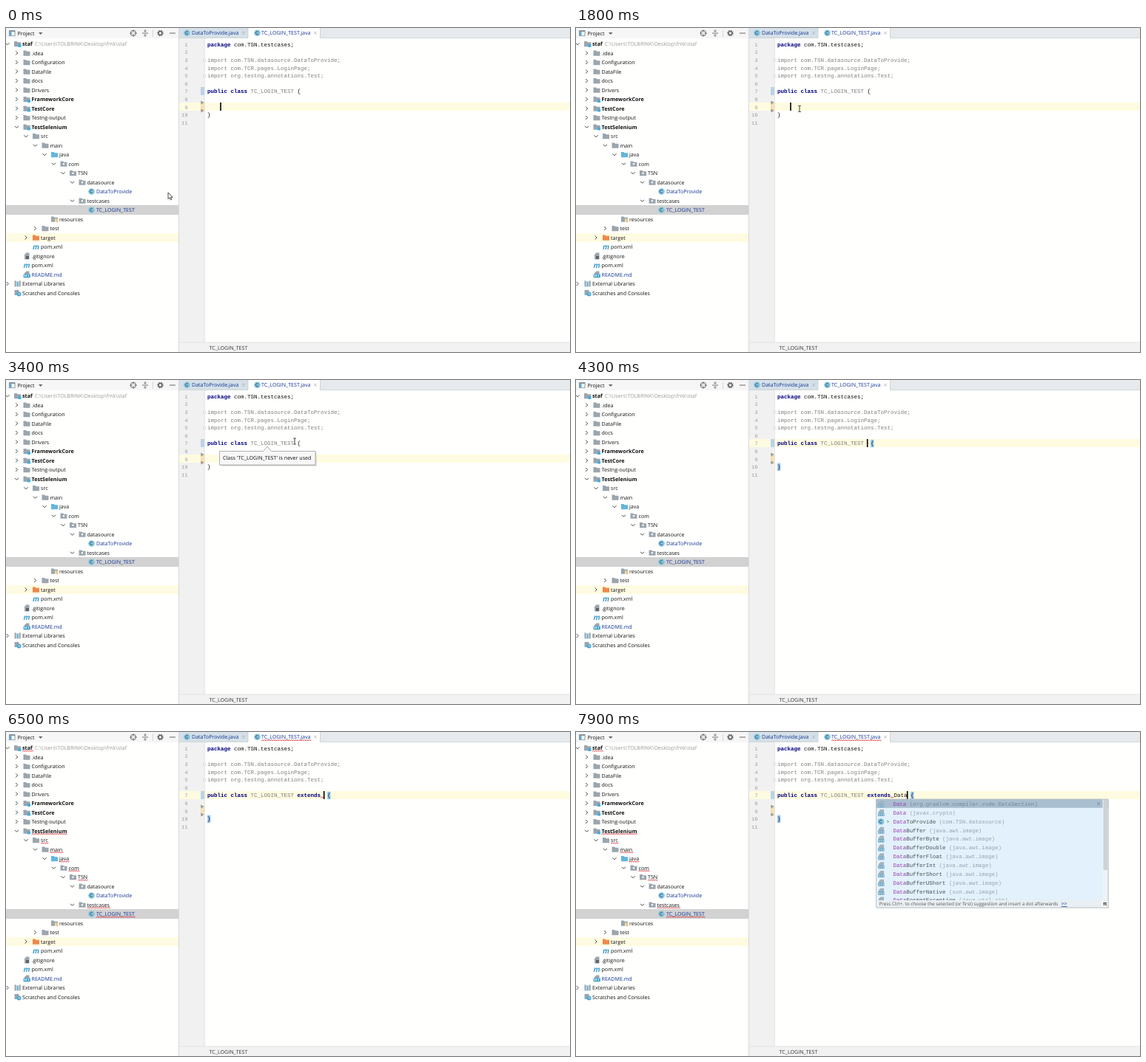
Animation, 762 px wide and 439 px high, one loop 8 s. Source, as an HTML page:

```html
<!DOCTYPE html>
<html lang="en">
<head>
<meta charset="utf-8">
<title>Editor session</title>
<style>
  html, body { margin: 0; width: 100%; height: 100%; overflow: hidden; background: #fff; }
  svg { display: block; width: 762px; height: 439px; }
  text { white-space: pre; text-rendering: geometricPrecision; }
  .ui { font: 7.1px "Open Sans", "Noto Sans", sans-serif; }
  .ui.b { font-size: 7.2px; font-weight: bold; }
  .code { font: 7.5px "Liberation Mono", "Courier New", monospace; }
</style>
</head>
<body>
<svg id="stage" viewBox="0 0 762 439" xmlns="http://www.w3.org/2000/svg"></svg>
<script>
const LOOP = 8000, CHAR = 4.5, CODE_X = 272, ROW = 12.5;
const NAVY = '#000080', GRAY = '#808080', INK = '#111', LINK = '#0f3494';
const stage = document.getElementById('stage');
const lineY = n => 22.5 + 10.6 * (n - 1);
const lineTop = n => Math.floor(lineY(n) - 5.6);

function el(tag, attrs, parent = stage) {
  const node = document.createElementNS('http://www.w3.org/2000/svg', tag);
  for (const key in attrs) node.setAttribute(key, attrs[key]);
  return parent.appendChild(node);
}
const group = (parent = stage) => el('g', {}, parent);
const rect = (x, y, width, height, fill, parent) => el('rect', { x, y, width, height, fill }, parent);
const stroke = (d, color, width = 1, parent) =>
  el('path', { d, fill: 'none', stroke: color, 'stroke-width': width }, parent);
const show = (node, on) => node.setAttribute('visibility', on ? 'visible' : 'hidden');

function text(x, y, content, fill = INK, cls = 'ui', parent) {
  const node = el('text', { x, y, fill, class: cls }, parent);
  node.textContent = content;
  return node;
}

// Each part is [string, colour, bold]
function spans(node, parts) {
  node.textContent = '';
  for (const [content, fill, bold] of parts) {
    const span = el('tspan', { fill, 'font-weight': bold ? 700 : 400 }, node);
    span.textContent = content;
  }
}

function squiggle(x, y, width, parent) {
  let d = `M${x} ${y}`;
  for (let i = 0; i * 1.5 < width; i++) d += `l1.5 ${i % 2 ? 0.8 : -0.8}`;
  stroke(d, '#d8343a', 0.9, parent);
}

function folder(x, y, color, parent) {
  el('path', { d: `M${x - 4.5} ${y - 3.5}h3.5l1.2 1.2h4.3v6h-9z`, fill: color }, parent);
}

function classIcon(x, y, parent) {
  el('circle', { cx: x, cy: y, r: 4.3, fill: '#84c5df' }, parent);
  stroke(`M${x + 1.5} ${y - 1.2}a2 2 0 1 0 0 2.4`, '#31505f', 0.9, parent);
}

function icon(kind, x, y) {
  const gray = '#9ba5ad';
  switch (kind) {
    case 'class': classIcon(x, y); break;
    case 'maven': {
      const m = text(x - 4.5, y + 3, 'm', '#3d9fcf', 'ui b');
      m.setAttribute('style', 'font-size:10px;font-style:italic');
      break;
    }
    case 'git':
      el('path', { d: `M${x - 3} ${y - 2}l2.5-2.5h4v9h-6.5z`, fill: gray });
      rect(x - 1, y, 4, 4, '#59636b');
      break;
    case 'md':
      el('path', { d: `M${x - 3} ${y - 2}l2.5-2.5h4v9h-6.5z`, fill: gray });
      rect(x - 4.5, y - 0.5, 9.5, 4.5, '#4aa3d0');
      stroke(`M${x - 3} ${y + 3}v-2.5l1.3 1.3 1.3-1.3v2.5M${x + 2.5} ${y}v3`, '#fff', 0.7);
      break;
    case 'library':
      for (let i = 0; i < 3; i++) rect(x - 4 + 3 * i, y - 4 + (i % 2), 2.2, 8 - (i % 2), i === 1 ? '#62b1d6' : gray);
      break;
    case 'scratch':
      el('path', { d: `M${x - 4} ${y - 4}h6v3l-3 4h-3z`, fill: gray });
      el('circle', { cx: x + 2, cy: y + 1.5, r: 3, fill: '#4aa9d5' });
      stroke(`M${x + 2} ${y}v1.7h1.5`, '#fff', 0.7);
      break;
    default:
      folder(x, y, { source: '#62b7dc', target: '#f0894a' }[kind] || gray);
      if (kind === 'module') rect(x + 1, y + 0.5, 4, 4, '#42b0dd');
      if (kind === 'package') el('circle', { cx: x, cy: y + 0.3, r: 1.2, fill: '#fff' });
      if (kind === 'resources') {
        rect(x + 0.5, y - 0.5, 4.5, 4.8, '#fff');
        for (let i = 0; i < 3; i++) rect(x + 1, y + 1.7 * i - 0.5, 4, 0.9, '#d8a13c');
      }
  }
}

// [level, arrow, icon, label, style flags: b bold, l link colour, e gets an error underline]
const tree = [
  [0, 'v', 'module', 'staf', 'be'],
  [1, '>', 'folder', '.idea'],
  [1, '>', 'folder', 'Configuration'],
  [1, '>', 'folder', 'DataFile'],
  [1, '>', 'folder', 'docs'],
  [1, '>', 'folder', 'Drivers'],
  [1, '>', 'module', 'FrameworkCore', 'b'],
  [1, '>', 'module', 'TestCore', 'b'],
  [1, '>', 'folder', 'Testng-output'],
  [1, 'v', 'module', 'TestSelenium', 'be'],
  [2, 'v', 'folder', 'src', 'e'],
  [3, 'v', 'folder', 'main', 'e'],
  [4, 'v', 'source', 'java', 'e'],
  [5, 'v', 'package', 'com', 'e'],
  [6, 'v', 'package', 'TSN', 'e'],
  [7, 'v', 'package', 'datasource'],
  [8, '', 'class', 'DataToProvide', 'l'],
  [7, 'v', 'package', 'testcases', 'e'],
  [8, '', 'class', 'TC_LOGIN_TEST', 'le'],
  [4, '', 'resources', 'resources'],
  [3, '>', 'folder', 'test'],
  [2, '>', 'target', 'target'],
  [2, '', 'maven', 'pom.xml'],
  [1, '', 'git', '.gitignore'],
  [1, '', 'maven', 'pom.xml'],
  [1, '', 'md', 'README.md', 'l'],
  [0, '>', 'library', 'External Libraries'],
  [0, '', 'scratch', 'Scratches and Consoles']
];

function drawTree(errors) {
  rect(0, 240, 233, 13, '#d2d2d2');
  rect(0, 278, 233, 12, '#fffbe2');
  tree.forEach(([level, arrow, kind, label, flags = ''], i) => {
    const x = ROW * level, y = 21.5 + ROW * i;
    if (arrow === 'v') stroke(`M${x - 0.5} ${y - 1.2}l2.5 2.5 2.5-2.5`, '#444', 1);
    if (arrow === '>') stroke(`M${x + 0.7} ${y - 2.5}l2.5 2.5-2.5 2.5`, '#444', 1);
    icon(kind, x + 15.5, y);
    const node = text(x + 22, y + 2.5, label, flags.includes('l') ? LINK : INK, flags.includes('b') ? 'ui b' : 'ui');
    if (flags.includes('e')) squiggle(x + 22, y + 4.6, node.getComputedTextLength(), errors);
  });
  text(39, 24, 'C:\\Users\\TOLBRINK\\Desktop\\fmk\\staf', '#999');
}

function drawHeader() {
  rect(0, 0, 233, 14, '#f6f6f6');
  rect(4, 3, 8.5, 8, '#8b969e');
  rect(5, 5.2, 6.5, 5, '#fff');
  rect(5, 5.2, 2.5, 5, '#55acd6');
  text(15.5, 9.7, 'Project');
  el('path', { d: 'M44 6h5.5l-2.75 3z', fill: '#666' });
  el('circle', { cx: 172, cy: 7, r: 3.7, fill: 'none', stroke: '#666', 'stroke-width': 1 });
  stroke('M172 2.5v3.2M172 8.3v3.2M167.5 7h3.2M173.3 7h3.2', '#666');
  stroke('M184 7h8M188 2v3M188 12v-3M186.3 3.6l1.7 1.7 1.7-1.7M186.3 10.4l1.7-1.7 1.7 1.7', '#666', 0.9);
  stroke('M198.5 2v10', '#d0d0d0', 0.8);
  el('circle', { cx: 208.5, cy: 7, r: 2.5, fill: 'none', stroke: '#666', 'stroke-width': 1.6 });
  el('circle', { cx: 208.5, cy: 7, r: 3.7, fill: 'none', stroke: '#666', 'stroke-width': 1.2, 'stroke-dasharray': '1.45 1.45' });
  stroke('M221 7h8', '#666');
}

function drawTabs(errors) {
  rect(234, 0, 528, 14, '#e6eaed');
  rect(234, 0, 93, 13, '#d5e0e8');
  rect(327, 0, 97, 14, '#fff');
  rect(234, 13, 93, 1, '#d3d7d9');
  rect(424, 13, 338, 1, '#d3d7d9');
  stroke('M327 0v13M424.5 0v13', '#c9cdd0', 0.8);
  [[244.5, 251, 'DataToProvide.java', 321], [339.5, 345, 'TC_LOGIN_TEST.java', 418]].forEach(([ix, tx, name, close]) => {
    classIcon(ix, 6.7);
    text(tx, 9.4, name, LINK);
    stroke(`M${close - 1.8} 4.8l3.6 3.6m0-3.6l-3.6 3.6`, '#aaa', 0.8);
  });
  squiggle(345, 11.6, 67, errors);
}

function drawCode() {
  const put = (n, parts) => {
    const node = text(CODE_X, lineY(n) + 2.3, '', INK, 'code');
    spans(node, parts);
    return node;
  };
  for (let n = 1; n <= 11; n++) {
    const num = text(245.5, lineY(n) + 2.2, n, '#999', 'code');
    num.setAttribute('text-anchor', 'end');
    num.setAttribute('style', 'font-size:6.8px');
  }
  put(1, [['package ', NAVY, 1], ['com.TSN.testcases;', INK]]);
  put(3, [['import com.TSN.datasource.DataToProvide;', GRAY]]);
  put(4, [['import com.TCR.pages.LoginPage;', GRAY]]);
  put(5, [['import org.testng.annotations.Test;', GRAY]]);
  put(10, [['}', INK]]);
  return put(7, []);
}

function drawTooltip() {
  const g = group();
  const d = 'M288.5 96.5h59l5.5-6.5 5.5 6.5h59.5v18.5h-129.5z';
  el('path', { d, fill: '#000', opacity: 0.1, transform: 'translate(1.8 2)' }, g);
  el('path', { d, fill: '#000', opacity: 0.12, transform: 'translate(.8 1)' }, g);
  el('path', { d, fill: '#f7f7f7', stroke: '#a9a9a9', 'stroke-width': 0.9 }, g);
  text(293, 108, "Class 'TC_LOGIN_TEST' is never used", INK, 'ui', g);
  return g;
}

function drawPopup() {
  const g = group();
  const rows = [
    ['', 'org.graalvm.compiler.code.DataSection'], ['', 'javax.crypto'], ['ToProvide', 'com.TSN.datasource'],
    ['Buffer', 'java.awt.image'], ['BufferByte', 'java.awt.image'], ['BufferDouble', 'java.awt.image'],
    ['BufferFloat', 'java.awt.image'], ['BufferInt', 'java.awt.image'], ['BufferShort', 'java.awt.image'],
    ['BufferUShort', 'java.awt.image'], ['BufferNative', 'sun.awt.image'], ['FormatException', 'java.util.zip']
  ];
  rect(406, 92, 314, 147, 'rgba(0,0,0,.1)', g);
  rect(405, 91, 314, 147, '#e2f1fb', g);
  rect(405, 91, 314, 11.8, '#a9bfd0', g);
  rows.forEach(([rest, pkg], i) => {
    const y = 97.7 + 11.85 * i;
    if (i === 2) {
      classIcon(412, y, g);
      stroke(`M420 ${y - 1.5}l2.5 1.5-2 1.2`, '#5aa55a', 1, g);
    } else {
      el('path', { d: `M409 ${y - 2}l2.5-2.5h4.5v9h-7z`, fill: '#a3b3bf' }, g);
      rect(408, y, 8.5, 4.3, '#6fa6c4', g);
      stroke(`M409.5 ${y + 0.8}v2.7M412.2 ${y + 0.8}v2.7M415 ${y + 0.8}v2.7`, '#e7f2fc', 0.8, g);
    }
    const row = text(428.5, y + 2.3, '', INK, 'code', g);
    row.setAttribute('style', 'font-size:7.4px');
    spans(row, [['Data', '#9a3bb0'], [rest, '#4a5157'], [` (${pkg})`, i ? '#98a3ab' : '#748694']]);
  });
  stroke('M704 95l2 2m2-2l-2 2m-2 2l2-2m2 2l-2-2', '#708296', 0.7, g);
  rect(711.5, 91, 7, 137, '#edf3f7', g);
  rect(712.5, 91, 5.5, 96, '#cdd2d5', g);
  rect(405, 228, 314, 10, '#e9eff2', g);
  const hint = text(409.5, 235.3, 'Press Ctrl+. to choose the selected (or first) suggestion and insert a dot afterwards', '#555', 'ui', g);
  hint.setAttribute('style', 'font-size:6.35px');
  const more = text(655.5, 235.3, '>>', LINK, 'ui', g);
  more.setAttribute('text-decoration', 'underline');
  rect(709.5, 228.5, 9, 9, '#f6f6f6', g);
  text(712, 235.2, 'π', '#333', 'ui b', g);
  el('rect', { x: 405.4, y: 91, width: 313.6, height: 147, fill: 'none', stroke: '#b4bfc7', 'stroke-width': 0.8 }, g);
  return g;
}

// Static scene, back to front
rect(0, 0, 762, 439, '#fffffe');
const errors = group();
drawTree(errors);
drawHeader();
rect(234, 14, 34, 412, '#f1f1f1');
const band = rect(234, 0, 528, 11, '#fffbe1');
stroke('M268.3 14v412', '#dcdcdc', 0.8);
stroke('M233.5 0v439', '#d8d8d8');
drawTabs(errors);
rect(234, 426, 528, 13, '#f2f2f2');
stroke('M234 426h528', '#dcdcdc', 0.8);
text(274.5, 436.3, 'TC_LOGIN_TEST', '#333');
for (const n of [3, 5]) el('circle', { cx: 268.3, cy: lineY(n), r: 1.8, fill: '#fff', stroke: '#c4c4c4', 'stroke-width': 0.7 });
rect(263, 80, 5, 11, '#b9d3e6');
rect(263, 101, 5, 11, '#f3e0b8');
for (const y of [101, 112]) el('path', { d: `M263.3 ${y - 2.5}l4.4 2.5-4.4 2.5z`, fill: '#9a9892' });
const openBrace = rect(0, 80.8, CHAR, 10.5, '#9bcdf5');
const closeBrace = rect(CODE_X, 112.6, CHAR, 10.5, '#9bcdf5');
const classLine = drawCode();
squiggle(CODE_X + 34 * CHAR, 89, CHAR, errors);
stage.appendChild(errors);
const caret = rect(0, 0, 1.6, 11, '#000');
const tooltip = drawTooltip();
const popup = drawPopup();
const arrow = el('path', { d: 'M0 0v8.6l2-1.8 1.4 3.1 1.4-.6-1.4-3h2.7z', fill: '#fff', stroke: '#222', 'stroke-width': 0.8 });
const beam = stroke('M-1.8-4h1.3q.5 0 .5.5v7q0 .5-.5.5h-1.3M1.8-4h-1.3q-.5 0-.5.5M1.8 4h-1.3q-.5 0-.5-.5', '#222', 0.9);

const CLICK = 3550, HIDE_POINTER = 4200, ERRORS_AT = 6000, POPUP_AT = 7800;
const TYPED = ' extends Data';
const keyTimes = [4200, 4700, 4800, 4900, 5000, 5100, 5200, 5300, 5400, 7400, 7600, 7700, 7800];
// [time, x, y] stops of the mouse pointer
const stops = [[0, 219, 223], [900, 219, 223], [1600, 302, 109.5], [1900, 302, 109.5],
  [2200, 353, 86], [2800, 353, 86], [3200, 390, 83]];

function pointerAt(t) {
  const next = stops.findIndex(s => s[0] > t);
  if (next < 0) return stops[stops.length - 1].slice(1);
  const [t0, x0, y0] = stops[next - 1], [t1, x1, y1] = stops[next];
  const p = (t - t0) / (t1 - t0), e = p * p * (3 - 2 * p);
  return [x0 + (x1 - x0) * e, y0 + (y1 - y0) * e];
}

function render(t) {
  const clicked = t >= CLICK;
  const count = keyTimes.filter(k => t >= k).length;
  const typed = TYPED.slice(0, count);
  const top = lineTop(clicked ? 7 : 9);

  spans(classLine, [['public class ', NAVY, 1], ['TC_LOGIN_TEST', GRAY],
    [typed.slice(0, 8), count >= 8 ? NAVY : INK, count >= 8], [typed.slice(8), INK], [' {', INK]]);
  band.setAttribute('y', top);
  openBrace.setAttribute('x', CODE_X + (27 + count) * CHAR);
  show(openBrace, clicked);
  show(closeBrace, clicked);

  const lastInput = count ? keyTimes[count - 1] : clicked ? CLICK : -300;
  caret.setAttribute('x', clicked ? CODE_X + (26 + count) * CHAR - 0.6 : 289.2);
  caret.setAttribute('y', top);
  show(caret, (t - lastInput) % 1000 < 500);

  const [x, y] = pointerAt(t);
  const inEditor = x > 268;
  arrow.setAttribute('transform', `translate(${x} ${y})`);
  beam.setAttribute('transform', `translate(${x} ${y})`);
  show(arrow, !inEditor);
  show(beam, inEditor && t < HIDE_POINTER);

  show(tooltip, t >= 2600 && !clicked);
  show(errors, t >= ERRORS_AT);
  show(popup, t >= POPUP_AT);
}

const start = performance.now();
function tick() {
  render((performance.now() - start) % LOOP);
  requestAnimationFrame(tick);
}
tick();
</script>
</body>
</html>
```
